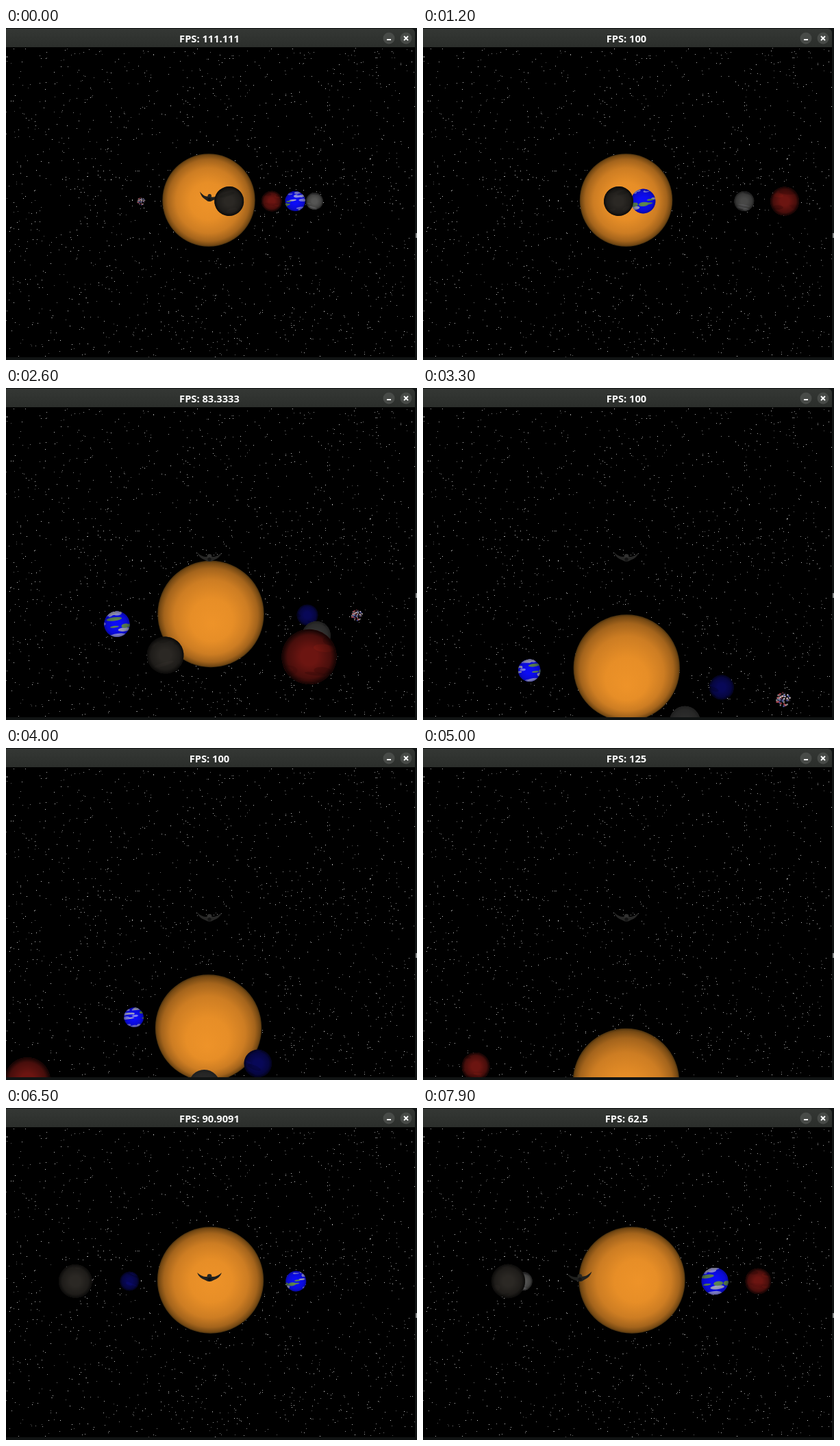
An HTML page with a canvas that plays this animation: 600x484 px, repeating every 8 s.

```html
<!DOCTYPE html>
<html lang="en">
<head>
<meta charset="utf-8">
<title>Solar system</title>
<style>
  html, body { margin: 0; width: 100%; height: 100%; overflow: hidden; background: #101313; }
  canvas { position: absolute; left: 0; top: 0; }
  #title {
    position: absolute; left: 0; top: 5px; width: 594px; line-height: 20px;
    text-align: center; color: #fff; white-space: pre;
    font: bold 14.67px/20px "Noto Sans", "Open Sans", sans-serif;
  }
</style>
</head>
<body>
<canvas id="stage" width="600" height="484"></canvas>
<div id="title"></div>
<script>
const ctx = document.getElementById('stage').getContext('2d');
const title = document.getElementById('title');
const LOOP = 8000, TICK = 100, TAU = Math.PI * 2;
const FOCAL = 546, CX = 297, HORIZON = 252.5, STEP = 78.5;
const VIEW = { x: 0, y: 29, w: 597, h: 451 };

const times = [0, 1200, 2600, 4000, 5000, 6500, 7900];
const frameMs = [9, 10, 9, 10, 11, 10, 12, 11, 10, 9, 10, 9, 8, 9, 10, 12, 11, 10, 13, 16];
const climbs = [[2200, 1], [3200, 1], [4300, 1], [5600, -1], [5900, -1], [6200, -1]];
const sunX = [296, 296.5, 299, 295.5, 296.5, 298.5, 305];

function random(seed) {
  return () => {
    seed = (seed + 0x6D2B79F5) | 0;
    let n = Math.imul(seed ^ (seed >>> 15), 1 | seed);
    n = (n + Math.imul(n ^ (n >>> 7), 61 | n)) ^ n;
    return ((n ^ (n >>> 14)) >>> 0) / 4294967296;
  };
}

function along(values, t) {
  let i = 0;
  while (i < times.length - 2 && t > times[i + 1]) i++;
  const k = (t - times[i]) / (times[i + 1] - times[i]);
  return values[i] + (values[i + 1] - values[i]) * k;
}

const ramp = (t, a, b) => Math.min(1, Math.max(0, (t - a) / (b - a)));

// orbit and size are in pixels at the sun's distance; angle 0 is behind the sun
const planets = [
  { orbit: 140, size: 16, angle: [101, 171, 235.6, 298, 350, 434.5, 496],
    base: '#0c0cf6', edge: 0.35, blobs: 30, seed: 12, spin: 1.1, tilt: -0.12,
    paint: ['#9c9cec', '#a9a9c4', '#5f8a4c', '#8484f2', '#0c0cf6'] },
  { orbit: 252, size: 22.6, angle: [33.5, 98.5, 161, 225.5, 284, 356, 423],
    base: '#6c1511', edge: 0.85, blobs: 14, seed: 5, spin: 0.8, tilt: 0.1, soft: 0.5,
    paint: ['#4b0c0b', '#8a1d15', '#5b100e'] },
  { orbit: 188, size: 15, angle: [80, 108, 143, 181.5, 208.5, 249, 290],
    base: '#555554', edge: 0.65, blobs: 9, seed: 31, spin: 0.9, tilt: 0.2, soft: 0.55, night: 0.5,
    paint: ['#77777a', '#3f3f40', '#8b8b8d'] },
  { orbit: 236, size: 15.4, angle: [175, 182, 189, 197, 203, 211.6, 209.3],
    base: '#2b2824', edge: 0.75, blobs: 9, seed: 8, spin: 0.5, tilt: -0.3, soft: 0.4,
    paint: ['#38342f', '#201e1b'] },
  { orbit: 143, size: 15.3, angle: [-22, 30, 90, 158, 215, 295, 362],
    base: '#080858', edge: 0.7, blobs: 9, seed: 19, spin: 0.7, tilt: 0.4, soft: 0.5,
    paint: ['#0d0d78', '#04043a'] },
  { orbit: 215, size: 8, angle: [-42, 20, 90, 158, 215, 290, 357],
    rock: true, seed: 44, paint: ['#d8c8cc', '#a63a42', '#4a54a0', '#17151c', '#8a8588'] }
];

for (const p of planets) {
  const rnd = random(p.seed);
  p.marks = Array.from({ length: p.rock ? 70 : p.blobs }, (_, i) => ({
    lat: (rnd() - 0.5) * 2.5, lon: rnd() * TAU,
    w: 0.28 + rnd() * 0.45, h: 0.06 + rnd() * 0.12,
    a: rnd() * TAU, d: Math.sqrt(rnd()), color: p.paint[i % p.paint.length]
  }));
}

const stars = (() => {
  const rnd = random(77);
  return Array.from({ length: 1650 }, () => ({
    x: Math.floor(rnd() * VIEW.w), y: VIEW.y + Math.floor(rnd() * VIEW.h),
    a: 0.35 + rnd() * 0.6
  }));
})();

function disc(x, y, r, fill) {
  ctx.fillStyle = fill;
  ctx.beginPath();
  ctx.arc(x, y, r, 0, TAU);
  ctx.fill();
}

function line(points, width, color) {
  ctx.strokeStyle = color;
  ctx.lineWidth = width;
  ctx.beginPath();
  points.forEach(([x, y], i) => i % 2 ? ctx.lineTo(x, y) : ctx.moveTo(x, y));
  ctx.stroke();
}

// the lit spot slides down and toward the camera axis as the view climbs
function drawSun(x, y, r, height) {
  const spot = r * (0.03 + height * 0.16);
  const g = ctx.createRadialGradient(x + (x - CX) * 1.2, y + spot, 0, x, y, r);
  g.addColorStop(0, '#ee9329');
  g.addColorStop(0.4, '#e78e27');
  g.addColorStop(0.7, '#cd7d23');
  g.addColorStop(0.88, '#a4641c');
  g.addColorStop(0.97, '#744813');
  g.addColorStop(1, '#48300e');
  disc(x, y, r, g);
}

function drawRock(p, x, y, r) {
  const s = Math.max(1, r * 0.22);
  for (const m of p.marks) {
    ctx.fillStyle = m.color;
    ctx.fillRect(x + Math.cos(m.a) * m.d * r - s / 2, y + Math.sin(m.a) * m.d * r - s / 2, s, s);
  }
}

function drawPlanet(p, x, y, r, facing, t) {
  ctx.save();
  ctx.translate(x, y);
  ctx.rotate(p.tilt);
  ctx.beginPath();
  ctx.arc(0, 0, r, 0, TAU);
  ctx.clip();
  disc(0, 0, r + 1, p.base);
  ctx.globalAlpha = p.soft || 0.95;
  for (const m of p.marks) {
    const lon = m.lon + p.spin * t / 1000, front = Math.cos(lon);
    if (front <= 0) continue;
    ctx.fillStyle = m.color;
    ctx.beginPath();
    ctx.ellipse(r * Math.cos(m.lat) * Math.sin(lon), r * Math.sin(m.lat),
      r * m.w * (0.25 + 0.75 * front), r * m.h, 0, 0, TAU);
    ctx.fill();
  }
  ctx.globalAlpha = 1;
  const dark = (p.night || 0) * Math.max(0, -facing);
  const g = ctx.createRadialGradient(0, 0, r * 0.3, 0, 0, r);
  g.addColorStop(0, `rgba(0,0,0,${dark})`);
  g.addColorStop(0.7, `rgba(0,0,0,${dark + (p.edge - dark) * 0.4})`);
  g.addColorStop(1, `rgba(0,0,0,${Math.max(dark, p.edge)})`);
  disc(0, 0, r + 1, g);
  ctx.restore();
}

function drawShip(t, lit) {
  const turn = ramp(t, 7300, 7900), settle = ramp(t, 0, 500);
  ctx.save();
  ctx.translate(CX - 68 * turn, 247);
  ctx.rotate(0.1 * (1 - settle) - 0.08 * turn);
  ctx.scale(0.82 + 0.18 * settle, 1);
  ctx.fillStyle = lit ? '#1f201e' : '#272726';
  ctx.beginPath();
  ctx.moveTo(-18, -7);
  ctx.quadraticCurveTo(-11, -1, -5, -1);
  ctx.lineTo(5, -1);
  ctx.quadraticCurveTo(11, -1, 18, -7);
  ctx.quadraticCurveTo(15, 1, 6, 4);
  ctx.quadraticCurveTo(0, 8, -6, 4);
  ctx.quadraticCurveTo(-15, 1, -18, -7);
  ctx.fill();
  disc(0, -1.5, 3.4, lit ? '#282722' : '#313130');
  disc(0, 2.5, 2.6, '#141414');
  ctx.restore();
}

function drawFrameBar() {
  const g = ctx.createLinearGradient(0, 0, 0, 28);
  g.addColorStop(0, '#353835');
  g.addColorStop(1, '#2b2e2b');
  ctx.fillStyle = '#111414';
  ctx.fillRect(0, 0, 600, 484);
  ctx.fillStyle = g;
  ctx.beginPath();
  ctx.roundRect(-4, 1, 601, 40, 6);
  ctx.fill();
  disc(559, 15, 8.5, '#484b48');
  disc(584, 15, 8.5, '#484b48');
  line([[556, 17], [562, 17]], 2, '#fff');
  line([[581, 12], [587, 18], [587, 12], [581, 18]], 1.8, '#fff');
  ctx.fillStyle = '#888b8b';
  ctx.fillRect(598, 299, 2, 7);
}

function drawSky() {
  ctx.fillStyle = '#000';
  ctx.fillRect(VIEW.x, VIEW.y - 1, VIEW.w, VIEW.h + 1);
  ctx.fillStyle = '#e2e2e2';
  for (const s of stars) {
    ctx.globalAlpha = s.a;
    ctx.fillRect(s.x, s.y, 1, 1);
  }
  ctx.globalAlpha = 1;
}

function draw(t) {
  const dist = t < 1500 ? 1.147 : 1;
  const height = climbs.reduce((sum, [at, by]) => sum + (t >= at ? by : 0), 0);
  const shift = 8 * ramp(t, 7300, 7900);

  drawFrameBar();
  ctx.save();
  ctx.beginPath();
  ctx.rect(VIEW.x, VIEW.y - 1, VIEW.w, VIEW.h + 1);
  ctx.clip();
  drawSky();

  const scene = planets.map(p => {
    const a = along(p.angle, t) * Math.PI / 180;
    const z = dist + p.orbit * Math.cos(a) / FOCAL;
    const x = CX + (shift + p.orbit * Math.sin(a)) / z;
    const y = HORIZON + STEP * height / z;
    const r = p.size / z;
    return { z, paint: () => p.rock ? drawRock(p, x, y, r) : drawPlanet(p, x, y, r, Math.cos(a), t) };
  });
  scene.push({ z: dist, paint: () => drawSun(along(sunX, t), 251 + STEP * height / dist, 77.7 / dist, height) });
  scene.push({ z: dist * 0.84, paint: () => drawShip(t, height === 0) });
  scene.sort((a, b) => b.z - a.z).forEach(o => o.paint());
  ctx.restore();

  title.textContent = 'FPS: ' + Number((1000 / frameMs[Math.floor(t / 400)]).toPrecision(6));
}

function loop() {
  draw(Math.floor(performance.now() % LOOP / TICK) * TICK);
  requestAnimationFrame(loop);
}
loop();
</script>
</body>
</html>
```
